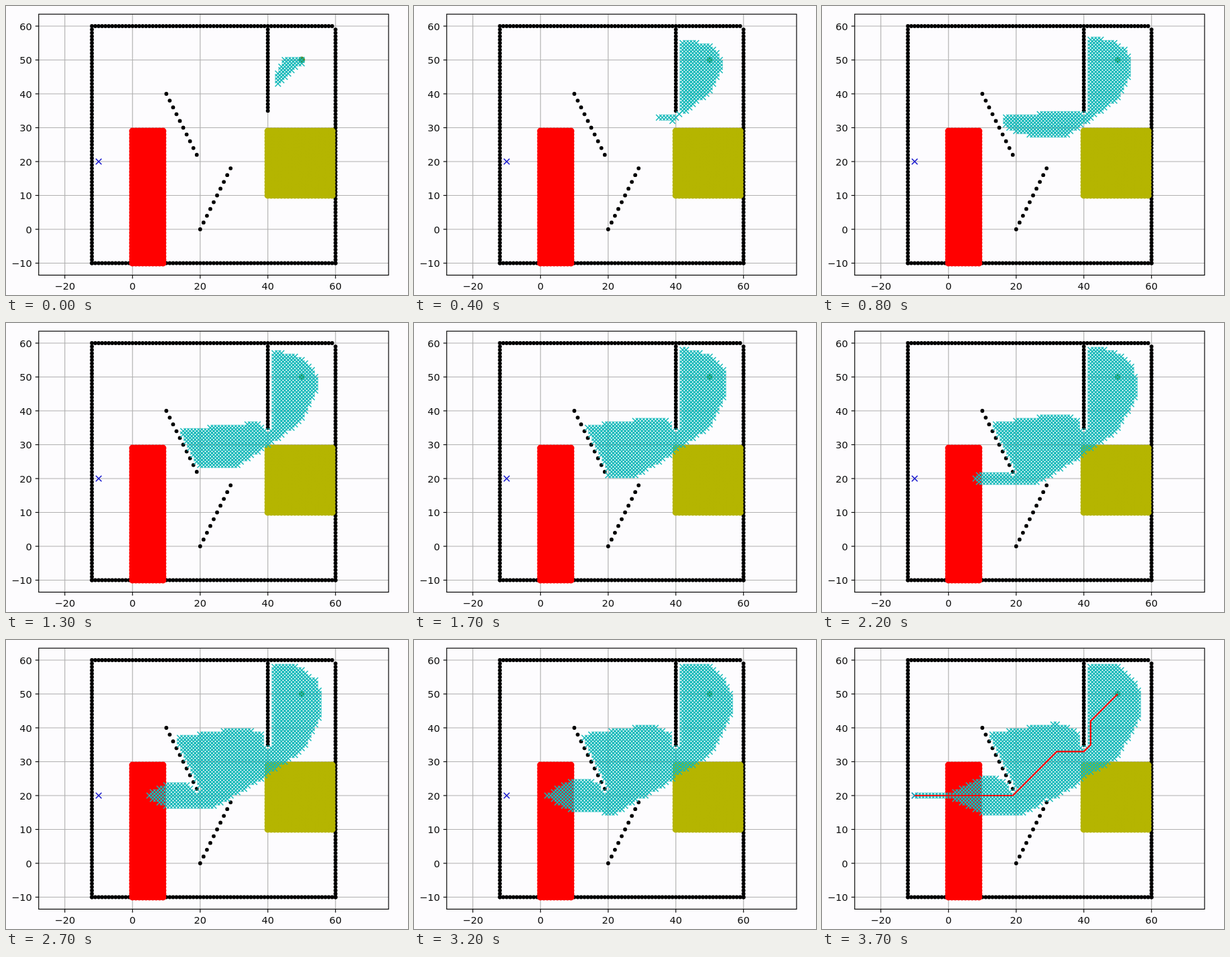
Recreate the animation shown at these times as an HTML page with a canvas. Size 600 px wide and 431 px high, loop 3800 ms.

```html
<!DOCTYPE html>
<html lang="en">
<head>
<meta charset="utf-8">
<title>Grid path search</title>
<style>
html, body { margin: 0; width: 100%; height: 100%; overflow: hidden; background: #fdfcfe; }
canvas { display: block; }
</style>
</head>
<body>
<canvas id="stage" width="600" height="431"></canvas>
<script>
const ctx = document.getElementById('stage').getContext('2d');
const X = x => 188.8 + 5.05 * x;
const Y = y => 333 - 5.05 * y;
const AXES = { left: 48.8, right: 571, top: 12.2, bottom: 401.4 };
const START = [50, 50], GOAL = [-10, 20];
const ROUTE = [START, [42, 42], [42, 35], [40, 33], [32, 33], [19, 20], GOAL];
const STEP = 100, STEPS = 38;

// Obstacles
const walls = [];
for (let x = -12; x <= 60; x++) walls.push([x, -10]);
for (let x = -12; x < 60; x++) walls.push([x, 60]);
for (let y = -10; y < 60; y++) walls.push([-12, y], [60, y]);
for (let y = 35; y < 60; y++) walls.push([40, y]);
for (let i = 0; i < 10; i++) walls.push([10 + i, 40 - 2 * i], [20 + i, 2 * i]);

// Slow areas: every step into one costs more
const areas = [
  { x0: 0, x1: 9, y0: -10, y1: 29, extra: 0.3, color: '#f00' },
  { x0: 40, x1: 59, y0: 10, y1: 29, extra: 0.15, color: '#b5b500' }
];

const key = (x, y) => x + ',' + y;
const blocked = new Set();
for (const [x, y] of walls) {
  for (const [dx, dy] of [[0, 0], [1, 0], [-1, 0], [0, 1], [0, -1]]) blocked.add(key(x + dx, y + dy));
}

function extraCost(x, y) {
  const a = areas.find(a => x >= a.x0 && x <= a.x1 && y >= a.y0 && y <= a.y1);
  return a ? a.extra : 0;
}

// A* search; returns the cells in the order they are visited
function search() {
  const moves = [[1, 0], [0, 1], [-1, 0], [0, -1], [-1, -1], [-1, 1], [1, -1], [1, 1]];
  const open = new Map(), closed = new Set(), visited = [];
  const node = (x, y, g) => ({ x, y, g, f: g + Math.hypot(x - GOAL[0], y - GOAL[1]) });
  open.set(key(...START), node(...START, 0));
  while (open.size) {
    let best = null;
    for (const n of open.values()) if (!best || n.f < best.f) best = n;
    visited.push(best);
    if (best.x === GOAL[0] && best.y === GOAL[1]) break;
    const id = key(best.x, best.y);
    open.delete(id);
    closed.add(id);
    for (const [dx, dy] of moves) {
      const x = best.x + dx, y = best.y + dy, k = key(x, y);
      if (blocked.has(k) || closed.has(k)) continue;
      const next = node(x, y, best.g + Math.hypot(dx, dy) * (1 + extraCost(x, y)));
      if (!open.has(k) || open.get(k).g > next.g) open.set(k, next);
    }
  }
  return visited;
}

const visited = search();
// Pace of the search: [step, cost level reached]
const pace = [[0, 67.7], [8, 74.15], [17, 76.51], [22, 77.38], [27, 78.25], [32, 79.03], [37, Infinity]]
  .map(([step, level]) => [step, visited.filter(n => n.f <= level).length]);

function visitedCount(step) {
  const i = Math.max(1, pace.findIndex(p => p[0] >= step));
  const [s0, n0] = pace[i - 1], [s1, n1] = pace[i];
  return Math.round(n0 + (n1 - n0) * (step - s0) / (s1 - s0));
}

function dot(x, y, r, color) {
  ctx.fillStyle = color;
  ctx.beginPath();
  ctx.arc(X(x), Y(y), r, 0, 2 * Math.PI);
  ctx.fill();
}

function cross(x, y, color) {
  const px = X(x), py = Y(y), r = 4.3;
  ctx.strokeStyle = color;
  ctx.lineWidth = 1.46;
  ctx.beginPath();
  ctx.moveTo(px - r, py - r);
  ctx.lineTo(px + r, py + r);
  ctx.moveTo(px - r, py + r);
  ctx.lineTo(px + r, py - r);
  ctx.stroke();
}

function line(points, color, width) {
  ctx.strokeStyle = color;
  ctx.lineWidth = width;
  ctx.beginPath();
  points.forEach(p => ctx.lineTo(...p));
  ctx.stroke();
}

function drawAxes() {
  const { left, right, top, bottom } = AXES;
  const label = v => String(v).replace('-', '\u2212');
  ctx.font = '14.6px "DejaVu Sans", sans-serif';
  ctx.fillStyle = '#111';
  ctx.textAlign = 'center';
  for (let v = -20; v <= 60; v += 20) {
    line([[X(v), top], [X(v), bottom]], '#b0b0b0', 1.17);
    line([[X(v), bottom], [X(v), bottom + 5]], '#000', 1.17);
    ctx.fillText(label(v), X(v), 422.6);
  }
  ctx.textAlign = 'right';
  for (let v = -10; v <= 60; v += 10) {
    line([[left, Y(v)], [right, Y(v)]], '#b0b0b0', 1.17);
    line([[left - 5, Y(v)], [left, Y(v)]], '#000', 1.17);
    ctx.fillText(label(v), 38.7, Y(v) + 5.5);
  }
}

function draw(step) {
  const { left, right, top, bottom } = AXES;
  ctx.fillStyle = '#fdfcfe';
  ctx.fillRect(0, 0, 600, 431);
  drawAxes();
  for (const [x, y] of walls) dot(x, y, 2.9, '#000');
  dot(...START, 5, '#4c8a2e');
  cross(...GOAL, '#11c');
  for (const a of areas) {
    for (let x = a.x0; x <= a.x1; x++) {
      for (let y = a.y0; y <= a.y1; y++) dot(x, y, 5.1, a.color);
    }
  }
  for (const n of visited.slice(0, visitedCount(step))) cross(n.x, n.y, '#12b9b9');
  if (step === STEPS - 1) line(ROUTE.map(([x, y]) => [X(x), Y(y)]), '#f00', 2.2);
  ctx.strokeStyle = '#000';
  ctx.lineWidth = 1.17;
  ctx.strokeRect(left, top, right - left, bottom - top);
}

let shown = -1;
function tick() {
  const step = Math.floor(performance.now() / STEP) % STEPS;
  if (step !== shown) draw(shown = step);
  requestAnimationFrame(tick);
}
tick();
</script>
</body>
</html>
```
